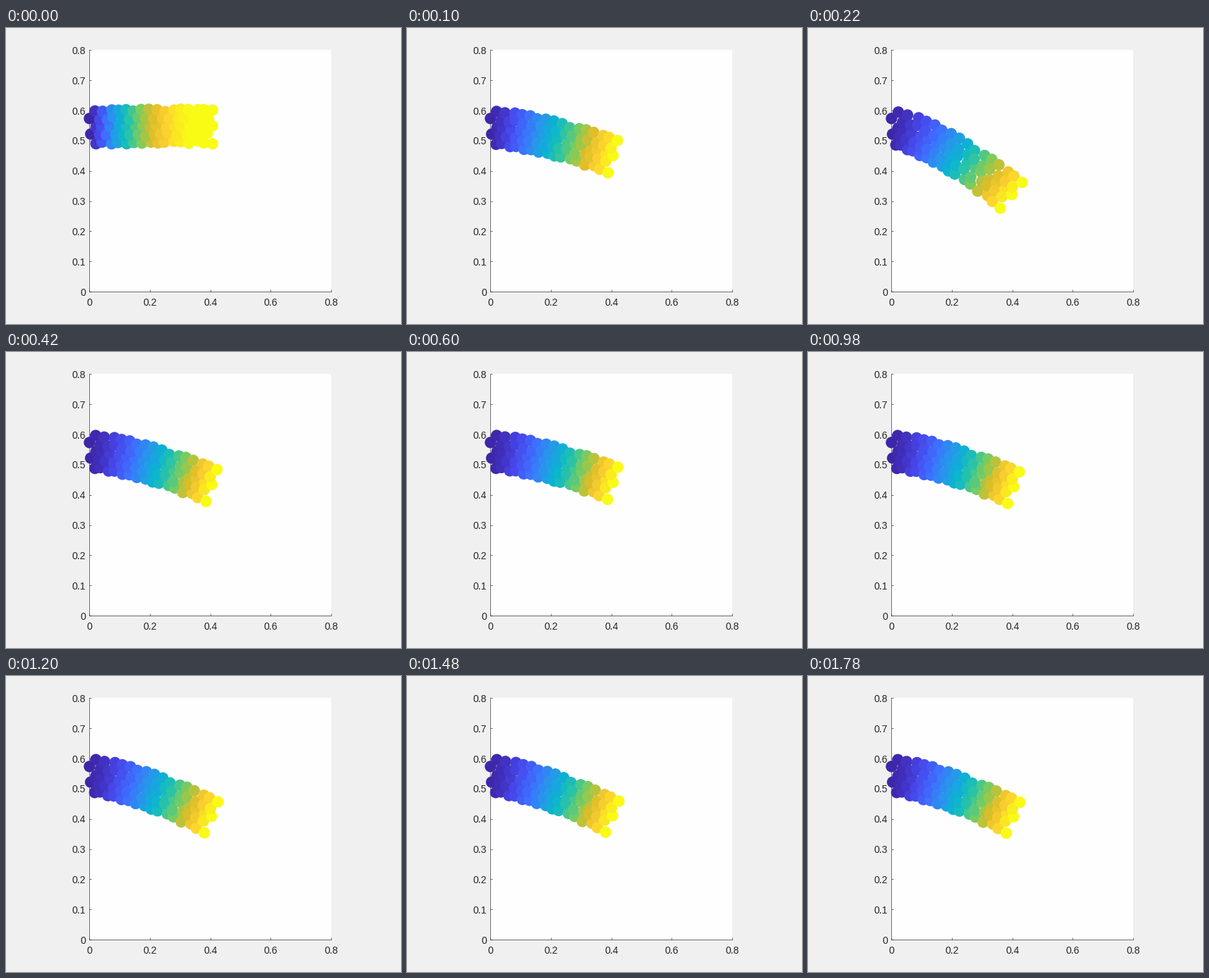
Write a matplotlib script that moves like this. It is 560x420 px and loops after 1800 ms.

```python
import numpy as np
import matplotlib.pyplot as plt
from matplotlib.animation import FuncAnimation
from matplotlib.colors import LinearSegmentedColormap

W, H, DPI = 560, 420, 100
FRAMES, STEP = 90, 20
PX = 72 / DPI  # points per pixel
INK = "#262626"

plt.rcParams["font.family"] = "Liberation Sans"

cmap = LinearSegmentedColormap.from_list("beam", [
    "#3e26a8", "#4747eb", "#3e6fff", "#2797eb", "#08b5d0",
    "#31c69f", "#81cc59", "#dcbd29", "#fccf30", "#f9fb15"])

# Resting beam: staggered rows of particles, slightly scattered
COLS, ROWS = 16, 5
LENGTH, MID, HALF = .405, .547, .053
rng = np.random.default_rng(4)
col, row = np.meshgrid(np.arange(COLS), np.arange(ROWS), indexing="ij")
X = (.017 + .026 * col - .013 * (row % 2)).ravel()
Y = (MID + HALF * (row - 2) / 2).ravel()
X = np.clip(X + rng.uniform(-.005, .005, X.size), 0, LENGTH + .002)
Y = Y + rng.uniform(-.005, .005, Y.size)

U = np.clip(X / LENGTH, 0, 1)
SAG = U ** 1.35
TILT = 1 - (1 - U) ** 3.5

# Colour along the beam: at release and once bending
SHADE_START = 1 - (1 - np.clip((X - .01) / .34, 0, 1)) ** 1.7
SHADE_BENT = U ** 1.45


def deflection(t):
    """Tip drop of the damped, slowly lengthening swing, t in ms."""
    cycles = t / 515 - 5e-8 * t * t
    return .1395 * (1 - np.exp(-.0016 * t) * np.cos(2 * np.pi * cycles))


def pose(t):
    d = deflection(t)
    tilt = 2.85 * d * TILT
    off = Y - MID
    x = X + off * tilt - .19 * d * d * U
    y = MID - d * SAG + off * np.sqrt(1 - tilt ** 2)
    return np.column_stack([x, y])


def shade(t):
    k = np.exp(-t / 60)
    return k * SHADE_START + (1 - k) * SHADE_BENT


fig = plt.figure(figsize=(W / DPI, H / DPI), dpi=DPI, facecolor="#f0f0f0")
side = 342.6
ax = fig.add_axes([118.4 / W, 46.0 / H, side / W, side / H], facecolor="#fefefe")
ax.set(xlim=(0, .8), ylim=(0, .8))
ticks = np.arange(9) / 10
ax.set_xticks(ticks[::2], [f"{v:g}" for v in ticks[::2]])
ax.set_yticks(ticks, [f"{v:g}" for v in ticks])
ax.tick_params(direction="in", length=3.4 * PX, width=.65 * PX, color=INK,
               labelcolor=INK, labelsize=14 * PX)
ax.tick_params(axis="x", pad=8.8 * PX)
ax.tick_params(axis="y", pad=5.2 * PX)
ax.spines[["top", "right"]].set_visible(False)
ax.spines[["left", "bottom"]].set(linewidth=.65 * PX, color=INK)

dots = ax.scatter(X, Y, s=(16.3 * PX) ** 2, c=SHADE_START, cmap=cmap, vmin=0,
                  vmax=1, linewidths=0, clip_on=False, zorder=10)


def draw(i):
    t = i * STEP
    dots.set_offsets(pose(t))
    dots.set_array(shade(t))
    return dots,


anim = FuncAnimation(fig, draw, frames=FRAMES, interval=STEP, repeat=True,
                     repeat_delay=0)
plt.show()
```
